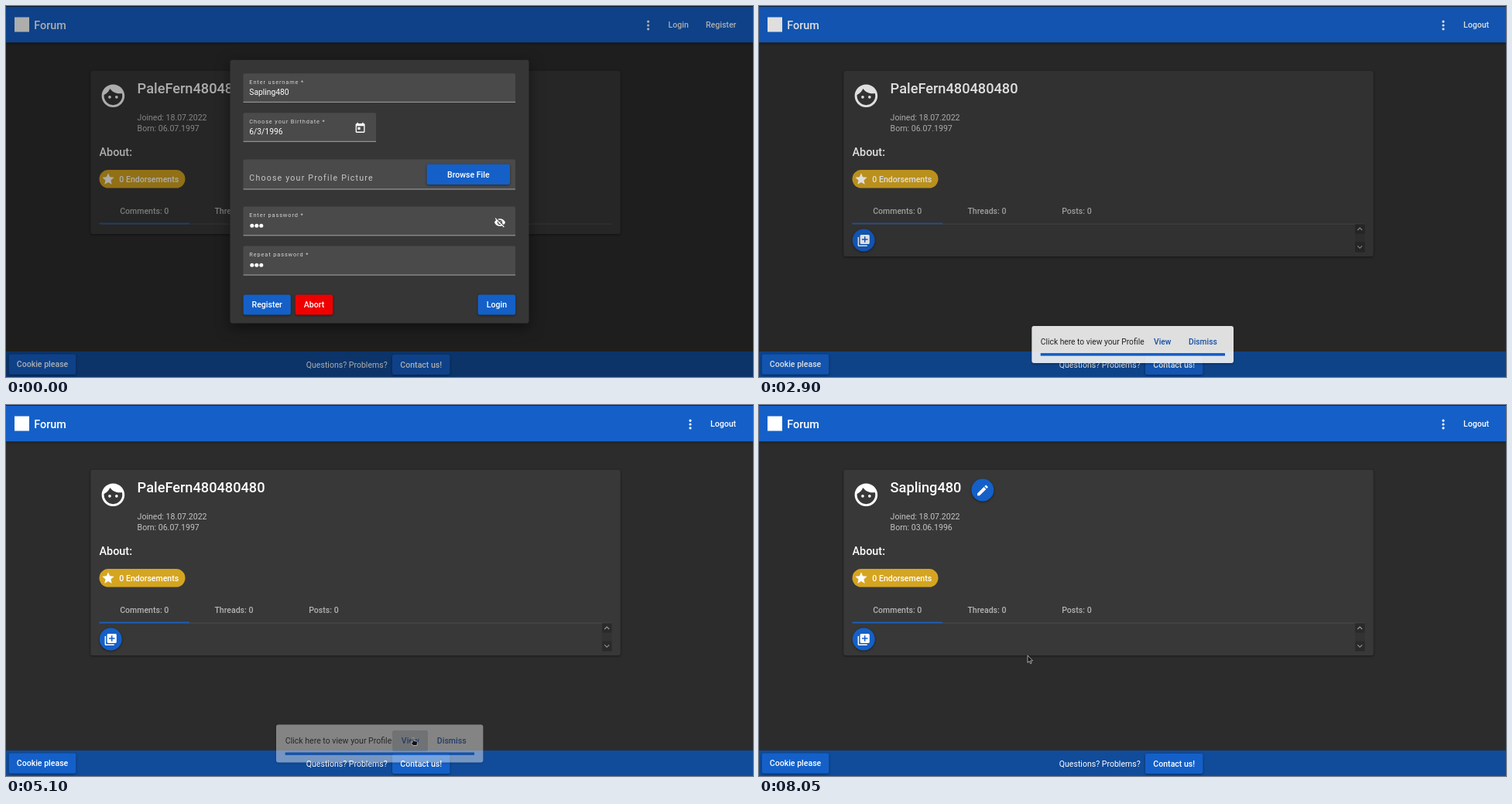
These frames come from a looping animation (965 px wide and 480 px high, 8.1 s). An HTML page:

```html
<!DOCTYPE html>
<html lang="en">
<head>
<meta charset="utf-8">
<title>Forum</title>
<style>
  html, body { margin: 0; width: 100%; height: 100%; overflow: hidden; background: #2c2c2c; }
  svg { display: block; width: 965px; height: 480px; font: 10.55px Roboto, sans-serif; fill: #fff; }
  text { white-space: pre; }
  .m { font-weight: 500; }
  .dim { fill: #c4c4c4; }
  .big { font-size: 14.4px; font-weight: 500; }
  .name { font-size: 18.2px; font-weight: 500; }
  .tab { font-weight: 500; fill: #b4b4b4; }
  .label { font-size: 7.4px; letter-spacing: .88px; fill: #d2d2d2; }
  .input { font-size: 10.3px; }
  .hint { font-size: 10.6px; letter-spacing: 1.2px; fill: #c8c8c8; }
  .dark { fill: #222; }
  .link { font-weight: 500; fill: #1656b4; }
  .raised { filter: drop-shadow(0 1px 1.5px rgba(0, 0, 0, .45)); }
  .modal { filter: drop-shadow(0 5px 9px rgba(0, 0, 0, .5)); }
</style>
</head>
<body>
<svg id="stage" viewBox="0 0 965 480"></svg>
<script>
const BLUE = '#1460c8';
const LOOP = 8100, STEP = 50;
const OLD_NAME = 'PaleFern480480480', NEW_NAME = 'Sapling480';

const ICONS = {
  face: 'M9 11.75a1.25 1.25 0 1 0 0 2.5 1.25 1.25 0 0 0 0-2.5zm6 0a1.25 1.25 0 1 0 0 2.5 1.25 1.25 0 0 0 0-2.5zM12 2C6.48 2 2 6.48 2 12s4.48 10 10 10 10-4.48 10-10S17.52 2 12 2zm0 18c-4.41 0-8-3.59-8-8 0-.29.02-.58.05-.86 2.36-1.05 4.23-2.98 5.21-5.37C11.07 8.33 14.05 10 17.42 10c.78 0 1.53-.09 2.25-.26.21.71.33 1.47.33 2.26 0 4.41-3.59 8-8 8z',
  star: 'M12 17.27L18.18 21l-1.64-7.03L22 9.24l-7.19-.61L12 2 9.19 8.63 2 9.24l5.46 4.73L5.82 21z',
  edit: 'M3 17.25V21h3.75L17.81 9.94l-3.75-3.75zM20.71 7.04a1 1 0 0 0 0-1.41l-2.34-2.34a1 1 0 0 0-1.41 0l-1.83 1.83 3.75 3.75z',
  add: 'M4 6H2v14c0 1.1.9 2 2 2h14v-2H4zm16-4H8c-1.1 0-2 .9-2 2v12c0 1.1.9 2 2 2h12c1.1 0 2-.9 2-2V4c0-1.1-.9-2-2-2zm-1 9h-4v4h-2v-4H9V9h4V5h2v4h4z',
  dots: 'M12 8a2 2 0 1 0 0-4 2 2 0 0 0 0 4zm0 2a2 2 0 1 0 0 4 2 2 0 0 0 0-4zm0 6a2 2 0 1 0 0 4 2 2 0 0 0 0-4z',
  date: 'M19 3h-1V1h-2v2H8V1H6v2H5c-1.1 0-2 .9-2 2v14c0 1.1.9 2 2 2h14c1.1 0 2-.9 2-2V5c0-1.1-.9-2-2-2zm0 16H5V8h14zM7 10h5v5H7z',
  hidden: 'M12 7c2.76 0 5 2.24 5 5 0 .65-.13 1.26-.36 1.83l2.92 2.92c1.51-1.26 2.7-2.89 3.43-4.75-1.73-4.39-6-7.5-11-7.5-1.4 0-2.74.25-3.98.7l2.16 2.16C10.74 7.13 11.35 7 12 7zM2 4.27l2.74 2.74C3.08 8.3 1.78 10.02 1 12c1.73 4.39 6 7.5 11 7.5 1.55 0 3.03-.3 4.38-.84L19.73 22 21 20.73 3.27 3zM7.53 9.8l1.55 1.55c-.05.21-.08.43-.08.65 0 1.66 1.34 3 3 3 .22 0 .44-.03.65-.08l1.55 1.55c-.67.33-1.41.53-2.2.53-2.76 0-5-2.24-5-5 0-.79.2-1.53.53-2.2zm4.31-.78l3.15 3.15.02-.16c0-1.66-1.34-3-3-3z',
};

const text = (x, y, s, cls, extra = '') => `<text x="${x}" y="${y}" class="${cls}" ${extra}>${s}</text>`;
const rect = (x, y, w, h, fill, r = 0, extra = '') =>
  `<rect x="${x}" y="${y}" width="${w}" height="${h}" rx="${r}" fill="${fill}" ${extra}/>`;
const icon = (name, cx, cy, scale) =>
  `<path d="${ICONS[name]}" transform="translate(${cx} ${cy}) scale(${scale}) translate(-12 -12)"/>`;
const group = (id, body, cls = '') => `<g id="${id}" class="${cls}">${body}</g>`;
const button = (x, y, w, label, fill = BLUE) =>
  rect(x, y, w, 26.2, fill, 2.5, 'class="raised"') +
  text(x + w / 2, y + 16.8, label, 'm', 'text-anchor="middle"');
const field = (y, w, h, label) =>
  rect(306.5, y, w, h, '#4a4a4a', 2) + rect(306.5, y + h - 1, w, 1, '#a4a4a4') +
  (label ? text(314.3, y + 13.6, label, 'label') : '');
const bullets = y => [317.8, 323.8, 329.8].map(x => `<circle cx="${x}" cy="${y}" r="2.5"/>`).join('');
const disc = (cx, cy) => `<circle cx="${cx}" cy="${cy}" r="14.4" fill="${BLUE}" class="raised"/>`;
const chevron = (y, d) =>
  `<path d="M773.2 ${y + d}l3-${3 * d / 1.5}l3 ${3 * d / 1.5}" fill="none" stroke="#9a9a9a" stroke-width="1.1"/>`
    .replace('l3--', 'l3 ');

const header =
  rect(0, 0, 965, 47.2, BLUE, 0, 'class="raised"') + rect(0, 0, 965, 1, '#16243a') +
  rect(11, 14.5, 19, 19, '#fff') + text(36.3, 30, 'Forum', 'big') +
  group('guestMenu', icon('dots', 829.6, 25, .8) + text(855.5, 28.2, 'Login', 'm') + text(904, 28.2, 'Register', 'm')) +
  group('userMenu', icon('dots', 884, 25, .8) + text(910, 28.2, 'Logout', 'm'));

const card =
  rect(109.3, 84, 684.5, 211, '#383838', 3, 'id="cardBox" class="raised"') +
  icon('face', 138.4, 116.3, 1.48) +
  text(169.6, 113.4, '', 'name', 'id="userName"') +
  group('editButton', disc(288.9, 110) + icon('edit', 288.9, 110.5, .76)) +
  text(169.6, 147.8, 'Joined: 18.07.2022', 'dim') +
  text(169.6, 162.3, '', 'dim', 'id="born"') +
  text(120.5, 194.2, 'About:', 'big') +
  rect(120.5, 212, 111, 23.6, '#d5a521', 11.8) + icon('star', 132, 223.9, .76) +
  text(146.3, 227.6, '0 Endorsements', 'm') +
  text(147.2, 268.7, 'Comments: 0', 'tab') + text(269.4, 268.7, 'Threads: 0', 'tab') + text(391.2, 268.7, 'Posts: 0', 'tab') +
  rect(120.5, 281.6, 661.5, 1, '#4b4b4b') + rect(120.5, 280.6, 116.5, 1.6, '#195fbe') +
  group('panel', disc(135.2, 303) + icon('add', 135.2, 303.5, .76) +
    rect(770, 282.5, 12.5, 36, '#333') + rect(770, 282.5, 12.5, 12, '#2a2a2a') + rect(770, 305.5, 12.5, 13, '#2a2a2a') +
    '<path d="M773.2 290l3-3 3 3M773.2 310.3l3 3 3-3" fill="none" stroke="#9a9a9a" stroke-width="1.1"/>');

const footer =
  rect(0, 447, 965, 33, '#114c9b') +
  button(3.7, 450.6, 86.6, 'Cookie please') +
  text(387.8, 467.6, 'Questions? Problems?', '') +
  button(499, 450.9, 74.5, 'Contact us!');

const dialog = rect(289.5, 69.8, 386, 340.8, '#363636', 3, 'class="modal"') +
  field(87.3, 351.6, 37.5, 'Enter username *') + text(314.3, 114.8, NEW_NAME, 'input') +
  field(138.3, 171.5, 37.5, 'Choose your Birthdate *') + text(314.3, 165.7, '6/3/1996', 'input') +
  icon('date', 457.6, 158, .66) +
  field(198.5, 351.6, 39) + text(314.3, 226, 'Choose your Profile Picture', 'hint') +
  button(543.6, 204.8, 107.4, 'Browse File') +
  field(259.5, 351.6, 37.8, 'Enter password *') + bullets(284.3) + icon('hidden', 638, 280, .64) +
  field(310.5, 351.6, 38, 'Repeat password *') + bullets(335.3) +
  button(306.6, 373.4, 61.2, 'Register') + button(373.7, 373.4, 48.6, 'Abort', '#ee0000') +
  button(609.6, 373.4, 48.6, 'Login');

const snack = rect(349, 413.4, 267.4, 49.2, '#fafafa', 3, 'class="raised"') +
  rect(499, 421, 46, 27, '#1b2a44', 2.5, 'id="hover"') +
  text(360.8, 438.3, 'Click here to view your Profile', 'dark') +
  text(510.8, 438.3, 'View', 'link') + text(556.8, 438.3, 'Dismiss', 'link') +
  rect(360.8, 449.7, 244.2, 3, '#2b2a4e') + rect(360.8, 449.7, 244.2, 3, BLUE, 0, 'id="progress"');

const pointers = '<g id="pointer" fill="#111" stroke="#ddd" stroke-width=".7" stroke-linejoin="round">' +
  '<path id="arrow" d="M0 0v9.4l2.2-2 1.5 3.3 1.4-.7-1.5-3.1h3z"/>' +
  '<path id="hand" d="M0 .8q.9-1.4 1.8 0v3.6l4 .9q.9.4.8 1.4l-.7 3.9h-5l-3.2-4q.6-1.2 2.3.2z"/></g>';

const stage = document.getElementById('stage');
stage.innerHTML = rect(0, 0, 965, 480, '#2c2c2c') + header + card + footer +
  rect(0, 0, 965, 480, '#000', 0, 'id="scrim"') + group('dialog', dialog) + group('snack', snack) + pointers;

const el = {};
stage.querySelectorAll('[id]').forEach(node => el[node.id] = node);

const clamp = v => Math.max(0, Math.min(1, v));
const ramp = (t, start, length) => clamp((t - start) / length);
const easeOut = (p, power = 2) => 1 - (1 - p) ** power;
const show = (node, on) => node.setAttribute('visibility', on ? 'visible' : 'hidden');

// time, x, y of the pointer's tip
const PATH = [
  [3600, 530, 492], [3850, 534, 462], [4050, 528, 446], [4400, 524, 432], [5100, 525, 430],
  [5300, 527, 445], [5850, 537, 484], [6750, 537, 484], [6800, 536, 479], [7200, 535, 477],
  [7600, 490, 430], [8000, 379, 333], [8050, 347, 324],
];

function pointerAt(t) {
  const next = PATH.findIndex(key => key[0] >= t);
  if (next < 1) return [PATH[0][1], PATH[0][2]];
  const [t0, x0, y0] = PATH[next - 1], [t1, x1, y1] = PATH[next];
  const p = (t - t0) / (t1 - t0);
  return [x0 + (x1 - x0) * p, y0 + (y1 - y0) * p];
}

function render(t) {
  const loggedIn = t >= 2800, ownProfile = t >= 6350;
  const panelOpen = loggedIn && (t < 6350 || t >= 7050);

  show(el.guestMenu, !loggedIn);
  show(el.userMenu, loggedIn);
  el.userName.textContent = ownProfile ? NEW_NAME : OLD_NAME;
  el.born.textContent = ownProfile ? 'Born: 03.06.1996' : 'Born: 06.07.1997';
  show(el.editButton, ownProfile);
  show(el.panel, panelOpen);
  el.cardBox.setAttribute('height', panelOpen ? 240 : 211);

  el.scrim.setAttribute('opacity', .32 * (1 - easeOut(ramp(t, 2750, 400))));
  el.dialog.setAttribute('opacity', 1 - ramp(t, 2725, 75));

  const enter = easeOut(ramp(t, 2825, 150), 3);
  const leaving = ramp(t, 5057, 75);
  const scale = .8 + .2 * enter;
  el.snack.setAttribute('opacity', enter * (1 - leaving));
  el.snack.setAttribute('transform', `translate(482.7 438) scale(${scale}) translate(-482.7 -438)`);
  const left = leaving ? 1 : 1 - ramp(t, 3025, 5000);
  el.progress.setAttribute('width', 244.2 * left);
  el.hover.setAttribute('opacity', .06 * ramp(t, 4100, 200) + .14 * ramp(t, 4950, 150));

  const [x, y] = pointerAt(t);
  const overView = t < 5150 && x > 499 && x < 545 && y > 421 && y < 448;
  const overContact = x > 499 && x < 573 && y > (t < 5150 ? 462 : 451) && y < 477;
  el.pointer.setAttribute('transform', `translate(${x} ${y})`);
  show(el.hand, overView || overContact);
  show(el.arrow, !overView && !overContact);
}

const begin = performance.now();
function tick() {
  const elapsed = (performance.now() - begin) % LOOP;
  render(Math.floor(elapsed / STEP) * STEP);
  requestAnimationFrame(tick);
}
tick();
</script>
</body>
</html>
```
